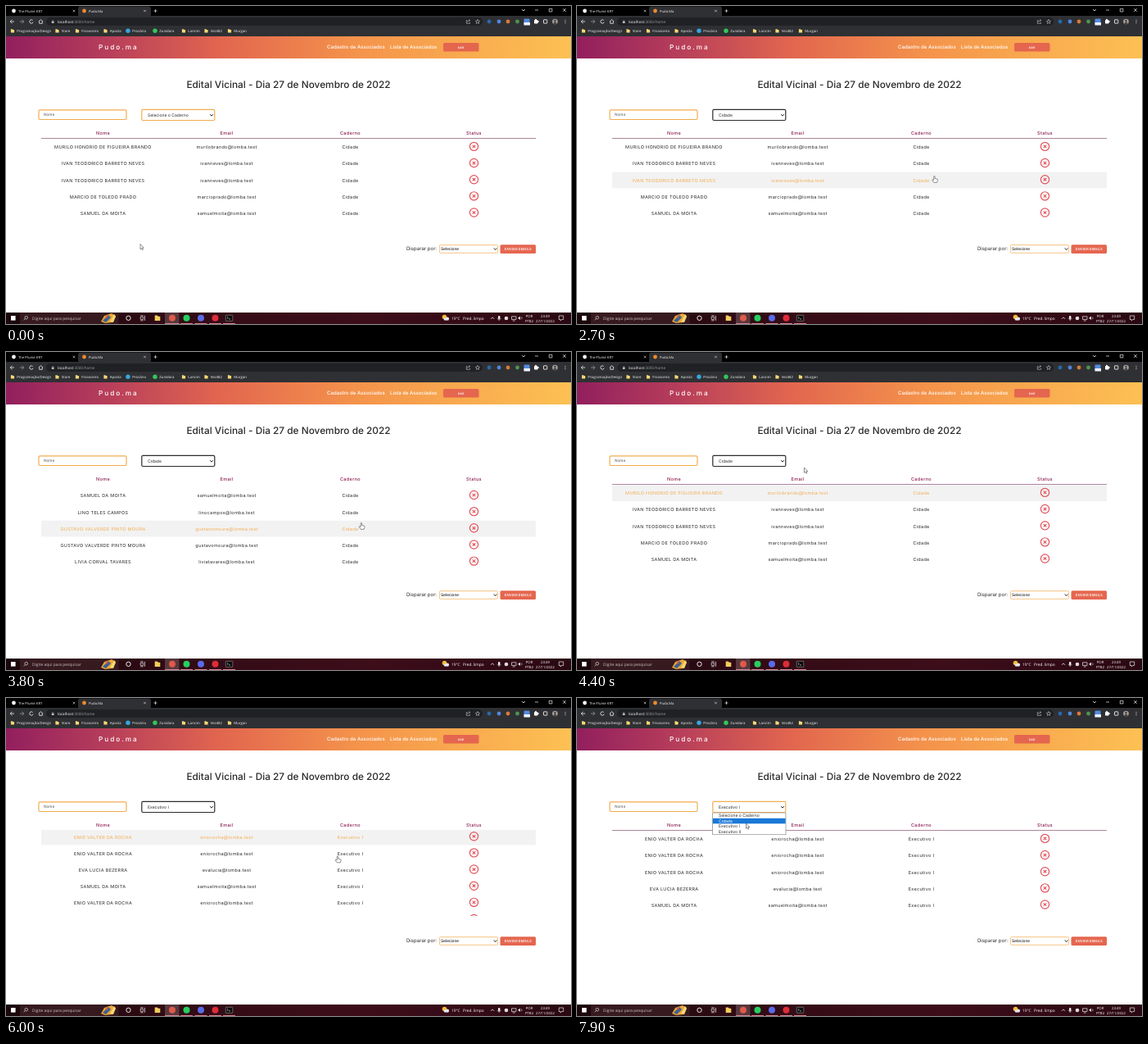
An HTML page with a canvas for the animation above (8 s loop, 690 by 388 pixels).

```html
<!DOCTYPE html>
<html lang="pt-BR">
<head>
<meta charset="utf-8">
<title>Pudo.Ma</title>
<style>
  html, body { margin: 0; width: 100%; height: 100%; overflow: hidden; background: #fff; }
  canvas { display: block; width: 690px; height: 388px; }
</style>
</head>
<body>
<canvas id="stage"></canvas>
<script>
const W = 690, H = 388, LOOP = 8000, STEP = 100;
const UI = '"Open Sans", sans-serif', PAGE = 'Inter, sans-serif', FORM = '"Liberation Sans", sans-serif';
const ORANGE = '#f2ac50', CORAL = '#e5664f', INK = '#2a2a2a', WINE = '#8b1d52', RED = '#e2525a';

const canvas = document.getElementById('stage');
const ctx = canvas.getContext('2d');
const ratio = window.devicePixelRatio || 1;
canvas.width = W * ratio;
canvas.height = H * ratio;

// ---- Data ----
const DOMAIN = '@lomba.test';
const PEOPLE = {
  murilo: ['MURILO HONORIO DE FIGUEIRA BRANDO', 'murilobrando'],
  ivan: ['IVAN TEODORICO BARRETO NEVES', 'ivanneves'],
  marcio: ['MARCIO DE TOLEDO PRADO', 'marcioprado'],
  samuel: ['SAMUEL DA MOITA', 'samuelmoita'],
  lino: ['LINO TELES CAMPOS', 'linocampos'],
  gustavo: ['GUSTAVO VALVERDE PINTO MOURA', 'gustavomoura'],
  livia: ['LIVIA CORVAL TAVARES', 'liviatavares'],
  enio: ['ENIO VALTER DA ROCHA', 'eniorocha'],
  eva: ['EVA LUCIA BEZERRA', 'evalucia']
};
const LISTS = {
  'Cidade': 'murilo ivan ivan marcio samuel lino gustavo gustavo livia'.split(' '),
  'Executivo I': 'enio enio enio eva samuel enio eva samuel enio'.split(' ')
};
const OPTIONS = ['Selecione o Caderno', 'Cidade', 'Executivo I', 'Executivo II'];
const COLUMNS = [['Nome', 118.5], ['Email', 269.5], ['Caderno', 420.5], ['Status', 571.5]];
const ROW = 20.15, FIRST_ROW = 172.3, MAX_SCROLL = 77.5;
const OPTION_TOP = 140.3, OPTION_H = 6.5;

// ---- Timeline ----
const CURSOR = [
  [0, 164, 290.5], [100, 164, 290.5], [700, 212, 134], [1000, 212, 134], [1100, 215, 140.5],
  [1500, 200, 149], [2200, 200, 149], [2600, 436, 207], [2700, 436.5, 207.5], [3100, 434, 208.5],
  [4150, 434, 208.5], [4300, 300, 172], [4400, 277.5, 141], [4600, 215, 133], [4800, 215, 133],
  [5100, 195, 156], [5400, 195, 156], [5800, 405, 193], [7200, 405, 193], [7500, 215, 133],
  [7600, 215, 133], [7800, 206, 158], [7900, 206.5, 152.9], [8000, 206.5, 152.9]
];
const ease = x => (1 - Math.cos(Math.PI * Math.min(1, Math.max(0, x)))) / 2;
const ramp = (t, start, span) => ease((t - start) / span);
const within = (t, a, b) => t >= a && t < b;

function cursorAt(t) {
  const i = Math.max(1, CURSOR.findIndex(k => k[0] >= t));
  const [t0, x0, y0] = CURSOR[i - 1], [t1, x1, y1] = CURSOR[i];
  const p = ramp(t, t0, t1 - t0);
  return { x: x0 + (x1 - x0) * p, y: y0 + (y1 - y0) * p };
}
const scrollAt = t => MAX_SCROLL *
  (ramp(t, 2710, 320) - ramp(t, 3800, 300) + ramp(t, 5900, 274) - ramp(t, 7000, 300));
const isOpen = t => within(t, 1000, 2000) || within(t, 4800, 5300) || t >= 7600;
const choiceAt = t => t < 2000 ? 0 : t < 5300 ? 1 : 2;

function hoveredRow(t) {
  const { x, y } = cursorAt(t);
  if (isOpen(t) || x < 43 || x > 647 || y < 162 || y > 266) return -1;
  return Math.floor((y + scrollAt(t) - FIRST_ROW) / ROW + 0.5);
}

// ---- Drawing helpers ----
function text(str, x, y, size, color, { font = PAGE, weight = 400, align = 'left', spacing = 0 } = {}) {
  ctx.font = `${weight} ${size}px ${font}`;
  ctx.letterSpacing = spacing + 'px';
  ctx.textRendering = 'geometricPrecision';
  ctx.textAlign = align;
  ctx.textBaseline = 'alphabetic';
  ctx.fillStyle = color;
  ctx.fillText(str, x, y + size * 0.36);
}
function rect(x, y, w, h, color) {
  ctx.fillStyle = color;
  ctx.fillRect(x, y, w, h);
}
function gradient(stops) {
  const g = ctx.createLinearGradient(0, 0, W, 0);
  stops.forEach(([at, color]) => g.addColorStop(at, color));
  return g;
}
function box(x, y, w, h, r, fill, stroke, width = 1) {
  ctx.beginPath();
  ctx.roundRect(x, y, w, h, r);
  if (fill) { ctx.fillStyle = fill; ctx.fill(); }
  if (stroke) { ctx.strokeStyle = stroke; ctx.lineWidth = width; ctx.stroke(); }
}
function dot(x, y, r, color) {
  ctx.fillStyle = color;
  ctx.beginPath();
  ctx.arc(x, y, r, 0, 7);
  ctx.fill();
}
function ring(x, y, r, color, width, from = 0, to = 7) {
  ctx.strokeStyle = color;
  ctx.lineWidth = width;
  ctx.beginPath();
  ctx.arc(x, y, r, from, to);
  ctx.stroke();
}
// SVG path data relative to (x, y)
function path(x, y, d, stroke, width = 0.7, fill) {
  ctx.save();
  ctx.translate(x, y);
  const p = new Path2D(d);
  if (fill) { ctx.fillStyle = fill; ctx.fill(p); }
  if (stroke) { ctx.strokeStyle = stroke; ctx.lineWidth = width; ctx.stroke(p); }
  ctx.restore();
}
const cross = (x, y, r, color, width) =>
  path(x, y, `M${-r} ${-r}L${r} ${r}M${r} ${-r}L${-r} ${r}`, color, width);
const chevron = (x, y, color) => path(x, y, 'M-1.8 -1L0 1L1.8 -1', color, 0.9);
function folder(x, y, s, color) {
  path(x, y, `M${-s} ${-s}H${-s * 0.1}L${s * 0.3} ${-s * 0.6}H${s}V${s}H${-s}Z`, null, 0, color);
}

// ---- Browser ----
function drawBrowser() {
  rect(0, 0, W, 12, '#000');
  rect(0, 12, W, 25, '#2f3033');
  box(88, 0.5, 89, 13, 3, '#2f3033');

  const label = (s, x, y, size = 4.2, color = '#f4f4f5') => text(s, x, y, size, color, { font: UI });
  dot(9.5, 6, 2.4, '#f4f4f4');
  label('The Plume KRT', 15, 6);
  dot(95.5, 6, 2.4, '#f08a2c');
  label('Pudo.Ma', 101, 6);
  cross(83, 6, 1.3, '#ddd', 0.6);
  cross(169.5, 6, 1.3, '#ddd', 0.6);
  path(182.5, 6, 'M-2 0H2M0 -2V2', '#eee', 0.7);
  chevron(632, 5, '#ddd');
  path(648, 5, 'M-2 0H2', '#eee', 0.7);
  box(663.3, 3.3, 3.6, 3.6, 0, null, '#eee', 0.7);
  cross(682, 5, 1.8, '#eee', 0.7);

  path(7.5, 19, 'M2.5 0H-2.3M0 -2.3L-2.3 0L0 2.3', '#eee', 0.8);
  path(19.5, 19, 'M-2.5 0H2.3M0 -2.3L2.3 0L0 2.3', '#999', 0.8);
  ring(31, 19, 2.2, '#eee', 0.8, 0.3, 5.6);
  path(42.5, 19, 'M-2.6 0L0 -2.4L2.6 0M-1.8 -.5V2.3H1.8V-.5', '#eee', 0.8);
  box(49, 14, 533, 10, 5, '#202124');
  box(55.8, 18.6, 2.8, 2.4, 0.3, '#bbb');
  ring(57.2, 18.5, 0.9, '#bbb', 0.5, Math.PI, 2 * Math.PI);
  label('localhost', 63, 19, 4.6, '#fff');
  label(':3000/home', 63 + ctx.measureText('localhost').width, 19, 4.6, '#9aa0a6');
  path(564.5, 19, 'M-1 -1.5H-2.2V2.3H2V.8M-.8 .8C-.6 -1 .6 -1.5 2.2 -1.5M.8 -2.7L2.2 -1.5L.8 -.2', '#ccc', 0.6);
  path(576, 19, 'M0 -2.6L.8 -.8L2.6 -.7L1.2 .5L1.6 2.4L0 1.4L-1.6 2.4L-1.2 .5L-2.6 -.7L-.8 -.8Z', '#ccc', 0.6);

  [[590, '#2669ad'], [602, '#4f86df'], [613, '#d97a34'], [624.5, '#4b9650']]
    .forEach(([x, color]) => dot(x, 19, 2.4, color));
  box(632.5, 15.5, 7, 7.5, 1, '#538be0');
  rect(632.5, 20, 7.5, 3.5, '#eef4ff');
  box(645, 17, 4.5, 4.5, 0.7, '#fff');
  dot(647, 16.7, 1, '#fff');
  dot(649.8, 19, 1, '#fff');
  box(656.5, 16.8, 4.3, 4.3, 0.4, null, '#eee', 0.9);
  dot(670.5, 19, 3.3, '#a9a29e');
  dot(670.5, 18, 1.2, '#3b3532');
  path(670.5, 21.7, 'M-2 0C-1.5 -2.8 1.5 -2.8 2 0Z', null, 0, '#3b3532');
  [-1.7, 0, 1.7].forEach(d => dot(683, 19 + d, 0.5, '#eee'));

  [['Programação/Design', 8], ['Store', 62.5], ['Financeiro', 87], ['Aposta', 121.5],
   ['Prosário', 149, '#38a5e0'], ['Zunidora', 182, '#36c65a'], ['Lancim', 217], ['Vez482', 244.5], ['Murgan', 273]]
    .forEach(([name, x, color]) => {
      color ? dot(x, 30.3, 2.7, color) : folder(x, 30.3, 2.1, '#f7d774');
      label(name, x + 5.3, 30.2, 4.3);
    });
}

// ---- Web page ----
function drawPage() {
  rect(0, 37, W, 337, '#fff');
  rect(0, 37, W, 27, gradient([
    [0, '#921f5e'], [0.17, '#b53c5b'], [0.38, '#e2664f'], [0.62, '#f4934b'], [1, '#fdc153']
  ]));
  text('Pudo.ma', 113, 50.5, 8.2, '#fff', { weight: 500, spacing: 2 });
  text('Cadastro de Associados', 392, 49.4, 6.1, '#fff', { weight: 500 });
  text('Lista de Associados', 469, 49.4, 6, '#fff', { weight: 500 });
  box(534, 45, 43.5, 10.6, 1.5, CORAL);
  text('sair', 555.7, 50.3, 4.4, '#fff', { weight: 500, align: 'center' });

  text('Edital Vicinal - Dia 27 de Novembro de 2022', 345, 95.7, 11.85, INK, { weight: 500, align: 'center' });
  box(40, 126.9, 107, 11.6, 1.5, '#fff', ORANGE, 1.2);
  text('Nome', 46, 132.7, 4.7, '#555');

  text('Disparar por:', 489, 296.2, 6.05, INK);
  box(529.5, 291.6, 71, 9.7, 1, '#fff', ORANGE, 0.7);
  text('Selecione', 531, 296.3, 5, '#111', { font: FORM });
  chevron(597.5, 296.5, '#111');
  box(603.5, 291.3, 43.5, 10.6, 1.5, CORAL);
  text('ENVIAR EMAILS', 625.3, 296.5, 4.3, '#fff', { weight: 500, align: 'center' });
}

function drawTable(t) {
  const scroll = scrollAt(t), hover = hoveredRow(Math.max(0, t - STEP));
  const section = OPTIONS[choiceAt(t) || 1];
  const cell = { align: 'center', spacing: 0.3 };
  COLUMNS.forEach(([name, x]) => text(name, x, 154.7, 5.6, WINE, { ...cell, weight: 500 }));

  ctx.save();
  ctx.beginPath();
  ctx.rect(40, 161, 610, 105);
  ctx.clip();
  LISTS[section].forEach((key, i) => {
    const y = FIRST_ROW + i * ROW - scroll, active = i === hover;
    const [name, user] = PEOPLE[key];
    if (active) rect(43, y - 10, 604, ROW - 0.4, '#f2f2f2');
    [name, user + DOMAIN, section].forEach((value, c) =>
      text(value, COLUMNS[c][1], y, 5.5, active ? ORANGE : INK, cell));
    ring(571.5, y - 0.9, 5.1, RED, 1.2);
    cross(571.5, y - 0.9, 1.7, RED, 1.2);
  });
  rect(43, 161.2 - scroll, 604, 0.7, '#8a5272');
  ctx.restore();
}

function drawSelect(t) {
  const choice = choiceAt(t), open = isOpen(t);
  const focused = choice > 0 && !open;
  box(165.8, 126.3, 89, 13.2, 1.5, '#fff', focused ? '#2c2c2c' : ORANGE, 1.2);
  text(OPTIONS[choice], 173, 132.9, 5.05, INK);
  chevron(251, 133.2, '#111');
  if (!open) return;

  const over = Math.floor((cursorAt(t).y - OPTION_TOP) / OPTION_H);
  const lit = over < 0 ? choice : Math.min(3, over);
  rect(165.3, 139.8, 90, 27, '#777');
  rect(165.9, OPTION_TOP, 88.8, 26, '#fff');
  OPTIONS.forEach((name, i) => {
    const y = OPTION_TOP + i * OPTION_H;
    if (i === lit) rect(165.9, y, 88.8, OPTION_H, '#1a78d6');
    text(name, 173, y + 3.2, 5.05, i === lit ? '#fff' : INK);
  });
}

// ---- Taskbar ----
function drawTaskbar() {
  rect(0, 374, W, 14, gradient([[0, '#1a070b'], [0.3, '#310b15'], [0.65, '#3d0d1a'], [1, '#2a0812']]));
  rect(6, 378, 5.6, 5.6, '#fff');
  rect(17, 374, 120.5, 14, '#361a20');
  ring(24.7, 380.2, 1.8, '#ddd', 0.7);
  path(23.4, 381.5, 'M0 0L-1.8 1.8', '#ddd', 0.7);
  text('Digite aqui para pesquisar', 32, 380.8, 4.9, '#cfc4c6', { font: UI });
  path(125, 381, 'M-9 4L-5 -3L4 -6L9 -3L5 5L-4 6Z', null, 0, '#e9a637');
  path(125, 381, 'M-7 3L0 -4L3 -1L-3 5Z', null, 0, '#3c5f94');
  path(125, 381, 'M2 4L7 -5L9 -2L6 5Z', null, 0, '#f6d873');
  dot(123, 379, 1.5, '#d95d42');

  ring(149.5, 380.8, 2.7, '#fff', 0.9);
  path(166.7, 380.8, 'M-2.5 -1.5H1V1.5H-2.5ZM-2.5 -3H1M-2.5 3H1M2.8 -3V3', '#eee', 0.7);
  folder(185, 380.8, 3.3, '#f4cd5c');
  rect(194, 374, 17.5, 14, '#55383d');
  [[203, '#e0594a'], [220.5, '#25cf60'], [238, '#5a6bea'], [255.5, '#de2c38']]
    .forEach(([x, color]) => dot(x, 380.8, 4, color));
  box(268.3, 377.3, 8.5, 7, 0.5, '#0b0b0b', '#999', 0.6);
  path(270, 380.5, 'M0 -1.2L1.3 0L0 1.2M2 1.4H4', '#fff', 0.6);
  [194, 213, 230.5, 248, 265].forEach((x, i) => rect(x, 387, i ? 15 : 17.5, 1, '#d58391'));

  const small = (s, x, y, align = 'left', size = 4.5) => text(s, x, y, size, '#fff', { font: UI, align });
  dot(535.5, 379.5, 2.8, '#f5bd36');
  dot(536.5, 382, 1.8, '#e2e7ee');
  dot(539, 381.7, 2.1, '#e2e7ee');
  small('19°C', 544, 380.8, 'left', 4.8);
  small('Pred. limpo', 558, 380.8, 'left', 4.8);
  path(594, 380.8, 'M-2 1L0 -1L2 1', '#eee', 0.8);
  box(601, 378, 2.4, 4, 1, '#eee');
  path(602.2, 382, 'M-2 -1C-1.5 1.2 1.5 1.2 2 -1M0 .5V2', '#eee', 0.6);
  dot(611, 381, 2.3, '#dcdcdc');
  box(617.5, 378.8, 5.5, 3.6, 0, null, '#eee', 0.7);
  path(620.2, 384, 'M-1.5 0H1.5', '#eee', 0.7);
  path(627.5, 380.8, 'M-2 -.8H-1L.5 -2.2V2.2L-1 .8H-2Z', null, 0, '#eee');
  ring(628, 380.8, 2, '#eee', 0.6, -0.8, 0.8);
  small('POR', 639, 378, 'center', 4.3);
  small('PTB2', 639, 384, 'center', 4.3);
  small('23:49', 658.5, 378, 'center', 4.3);
  small('27/11/2022', 658.5, 384, 'center', 4.3);
  path(678, 380.5, 'M-2.7 -2.5H2.7V2H.8L-.8 3.5V2H-2.7Z', '#eee', 0.7);
}

function drawCursor(t) {
  const { x, y } = cursorAt(t);
  const hand = hoveredRow(t) >= 0;
  path(x, y, hand
    ? 'M-.8 .6C-.8 -.3 .6 -.3 .6 .6V3L3.6 3.7C4.3 4 4.2 5 3.8 6L3.2 7.8H-.7L-2.9 4.9C-2.9 4.1 -2 4 -.8 5Z'
    : 'M0 0V6.2L1.4 5L2.4 7.2L3.4 6.7L2.5 4.6H4.3Z', '#444', 0.6, '#fff');
}

function frame(now) {
  const t = Math.floor((now % LOOP) / STEP) * STEP;
  ctx.setTransform(ratio, 0, 0, ratio, 0, 0);
  drawPage();
  drawTable(t);
  drawSelect(t);
  drawBrowser();
  drawTaskbar();
  drawCursor(t);
  requestAnimationFrame(frame);
}
requestAnimationFrame(frame);
</script>
</body>
</html>
```
